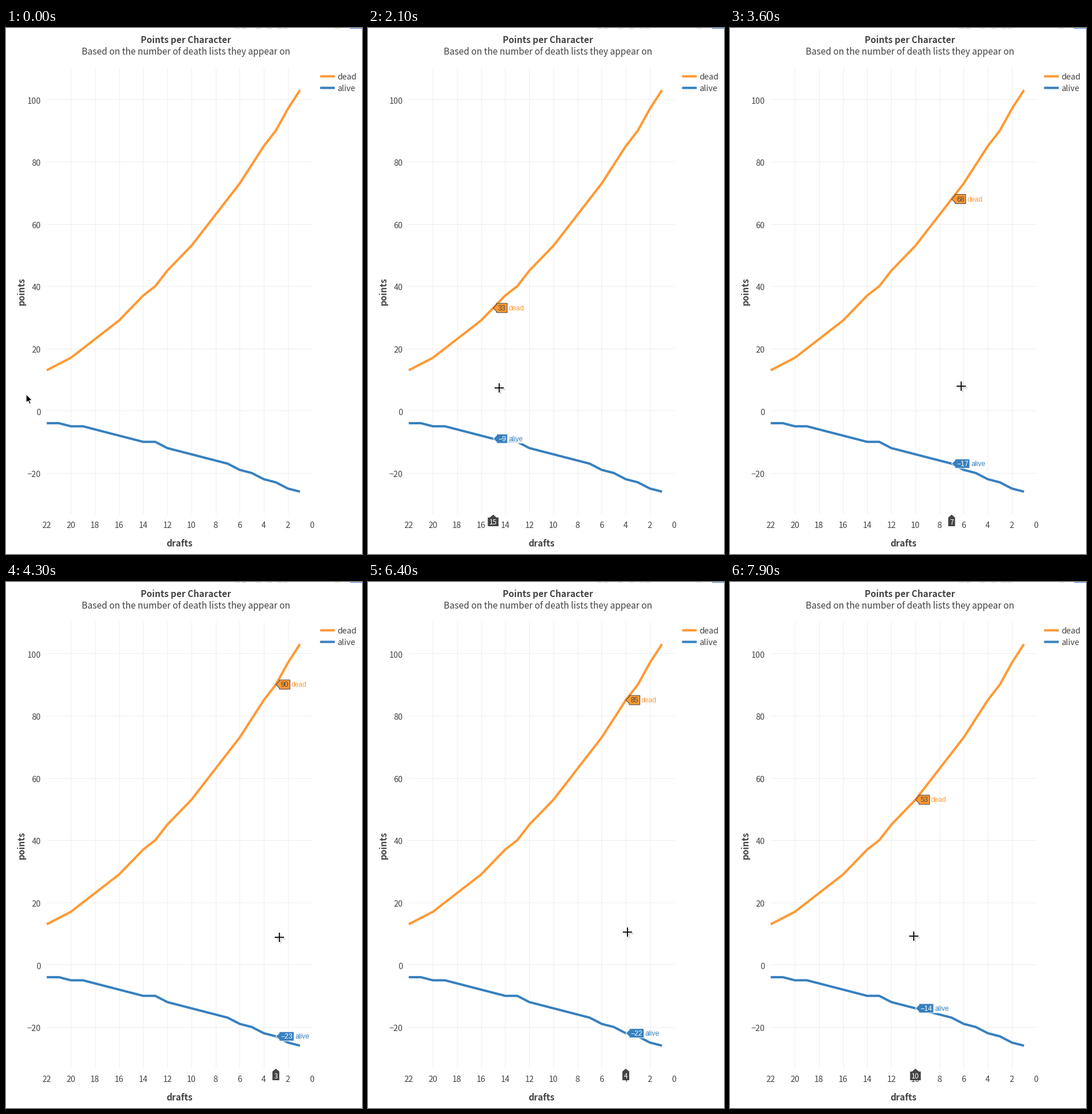
These frames come from a looping animation (616 by 909 pixels, 8 s). A matplotlib script:

```python
import numpy as np
import matplotlib.pyplot as plt
from matplotlib.animation import FuncAnimation
from matplotlib.patches import Polygon, Rectangle

W, H, DPI = 616, 909, 100
PT = 72 / DPI
STEP = 20.866
INK, GRID = "#444444", "#eeeeee"
ORANGE, BLUE = "#ff9933", "#3780bf"
SANS, HOVER = "Noto Sans CJK JP", "Liberation Sans"

# points grow quadratically as drafts fall; survivors lose a quarter of that
DRAFTS = np.arange(22, 0, -1)
DEAD = 13 + (22 - DRAFTS) * (44 - DRAFTS) // 10
ALIVE = -DEAD // 4

# pointer: moving steps, x, y; it rests for one step at each of PAUSES
PAUSES = np.array([20, 32, 37])
PATH = np.array([
    (0, 35, 633), (13, 160, 629), (18, 194, 624), (20, 227, 622),
    (30, 350, 622), (40, 473, 614), (43, 478, 612), (48, 505, 608),
    (61, 449, 605), (70, 332, 609), (74, 303, 611), (76, 318, 612),
])


def px(d):
    return 70.5 + (22 - d) * STEP


def py(v):
    return 661.4 - v * 5.38


def pointer(n):
    moved = n - np.sum(PAUSES <= n)
    return tuple(np.interp(moved, PATH[:, 0], PATH[:, k]) for k in (1, 2))


def signed(v):
    return str(v).replace("-", "\u2212")


def advance(s, size=12):
    return sum(0.584 if c == "\u2212" else 0.556 for c in s) * size


fig = plt.figure(figsize=(W / DPI, H / DPI), dpi=DPI, facecolor="white")
ax = fig.add_axes([0, 0, 1, 1])
ax.set_xlim(0, W)
ax.set_ylim(H, 0)
ax.axis("off")


def line(xs, ys, color, width, z=1, **kw):
    return ax.plot(xs, ys, color=color, lw=width * PT, zorder=z,
                   solid_capstyle="butt", **kw)[0]


def text(x, y, s, size, color=INK, font=SANS, ha="center", z=3, **kw):
    return ax.text(x, y, s, fontsize=size * PT, color=color, family=font,
                   ha=ha, va="baseline", zorder=z, **kw)


def shape(face, edge="none", width=0, z=4, **kw):
    return ax.add_patch(Polygon([(0, 0), (0, 1), (1, 1)], closed=True, fc=face,
                                ec=edge, lw=width * PT, zorder=z, **kw))


# axes
for d in range(0, 23, 2):
    if 0 < d < 22:
        line([px(d)] * 2, [68, 840], GRID, 1)
    text(px(d), 864, str(d), 14.2)
for v in range(-20, 101, 20):
    line([70, 530], [py(v)] * 2, GRID, 1)
    text(60.5, py(v) + 7.2, signed(v), 14.2, ha="right")

# traces with their legend rows
for row, (name, data, color) in enumerate((("dead", DEAD, ORANGE),
                                           ("alive", ALIVE, BLUE))):
    line(px(DRAFTS), py(data), color, 4, 2, solid_joinstyle="miter")
    y = 83.5 + 20 * row
    line([543.5, 568.8], [y, y], color, 4, snap=False)
    text(573, y + 5.5, name, 14.2, ha="left")

# titles
text(311, 26, "Points per Character", 15.4, weight="bold")
text(311, 46, "Based on the number of death lists they appear on", 15.4)
text(300, 895.5, "drafts", 15.4, weight="bold")
text(32, 454.5, "points", 15.4, weight="bold", rotation=90,
     rotation_mode="anchor")

# lower edge of the toolbar
for x in (396, 408, 433, 452, 470, 480, 569):
    ax.add_patch(Rectangle((x, 0), 8, 1, fc="#d3d3d3", lw=0))
ax.add_patch(Rectangle((595, 0), 21, 1, fc="#447adb", lw=0))


class Tag:
    """Value flag with the trace name beside it."""

    def __init__(self, data, name, name_width, fill, ink, edge):
        self.data, self.name_width = data, name_width
        self.veil = shape("white", z=4, alpha=0.8)
        self.flag = shape(fill, edge, 1, z=5)
        self.value = text(0, 0, "", 12, ink, HOVER, z=6)
        self.name = text(0, 0, name, 12, fill, HOVER, ha="left", z=6)
        self.parts = [self.veil, self.flag, self.value, self.name]

    def place(self, i):
        x, y = px(DRAFTS[i]), py(self.data[i])
        label = signed(self.data[i])
        a = x + 6
        b = a + advance(label) + 5
        c = b + self.name_width + 5
        self.flag.set_xy([(x, y), (a, y - 6), (a, y - 8), (b, y - 8),
                          (b, y + 8), (a, y + 8), (a, y + 6)])
        self.veil.set_xy([(b, y - 8), (c, y - 8), (c, y + 8), (b, y + 8)])
        self.value.set_text(label)
        self.value.set_position(((a + b) / 2, y + 4))
        self.name.set_position((b + 2.5, y + 4))


class AxisTag:
    """Dark flag on the drafts axis."""

    def __init__(self):
        self.flag = shape(INK, z=5)
        self.value = text(0, 857.5, "", 12, "white", z=6)
        self.parts = [self.flag, self.value]

    def place(self, i):
        x, label = px(DRAFTS[i]), str(DRAFTS[i])
        r = advance(label) / 2 + 2.6
        n = min(r, 6)
        self.flag.set_xy([(x, 841), (x + n, 846), (x + r, 846), (x + r, 861),
                          (x - r, 861), (x - r, 846), (x - n, 846)])
        self.value.set_text(label)
        self.value.set_x(x)


tags = [Tag(DEAD, "dead", 26.7, ORANGE, INK, INK),
        Tag(ALIVE, "alive", 24.7, BLUE, "white", "white"),
        AxisTag()]

ARROW = np.array([(0, 0), (0, 14.5), (3.3, 11.5), (5.8, 16.8),
                  (8, 15.8), (5.7, 10.6), (10, 10.3)])
arrow = shape("black", "white", 1, z=9)
# (offset, half length, colour, width)
STROKES = [(2, 8, "#b5b5b5", 1.4), (0, 8.6, "white", 3.4), (0, 8, "black", 1.8)]
cross = [[line([], [], c, w, 8 + k / 10) for _ in "hv"]
         for k, (_, _, c, w) in enumerate(STROKES)]


def show(parts, on):
    for p in parts:
        p.set_visible(on)


def draw(n):
    x, y = pointer(n)
    inside = x > 70
    show([arrow], not inside)
    arrow.set_xy(ARROW + (x, y))
    for (off, r, _, _), (h, v) in zip(STROKES, cross):
        cx, cy = x + 0.3 + off, y + 0.3 + off
        show((h, v), inside)
        h.set_data([cx - r, cx + r], [cy, cy])
        v.set_data([cx, cx], [cy - r, cy + r])

    # the tags trail the pointer by one step
    lag = pointer(max(n - 1, 0))[0]
    i = int(np.clip(round((lag - 70.5) / STEP), 0, 21))
    for tag in tags:
        show(tag.parts, lag > 70)
        tag.place(i)
    return []


anim = FuncAnimation(fig, draw, frames=80, interval=100, repeat=True,
                     repeat_delay=0, init_func=lambda: draw(0))
plt.show()
```
